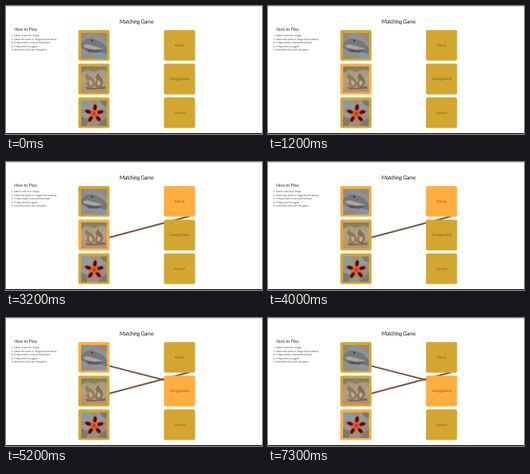
Recreate the animation shown at these times as an HTML page. Size 320 by 161 pixels, loop 7400 ms.

```html
<!DOCTYPE html>
<html lang="en">
<head>
<meta charset="utf-8">
<title>Matching Game</title>
<style>
  html, body { margin: 0; width: 100%; height: 100%; overflow: hidden; background: #fff; }
  svg { display: block; width: 100%; height: 100%; }
  text { text-rendering: geometricPrecision; fill: #222; }
  .title { font: 6.9px Lato, sans-serif; letter-spacing: -.42px; text-anchor: middle; }
  .how { font: 5.25px Lato, sans-serif; }
  .steps { font: 2.97px "Open Sans", sans-serif; }
  .word { font: 4.45px "Open Sans", sans-serif; text-anchor: middle; fill: #795548; }

  .card { fill: #d3a72f; }
  .line { stroke: #795548; stroke-width: 1.9; visibility: hidden; }
  .card, .line { animation: 7.4s linear infinite; }
  #l1 { animation-name: pick-l1; }
  #l2 { animation-name: pick-l2; }
  #l3 { animation-name: pick-l3; }
  #r1 { animation-name: pick-r1; }
  #r2 { animation-name: pick-r2; }
  #link1 { animation-name: link1; animation-timing-function: step-end; }
  #link2 { animation-name: link2; animation-timing-function: step-end; }

  @keyframes pick-l2 {
    0%, .7%, 54.4%, 100% { fill: #d3a72f; }
    2.7%, 52.8% { fill: #ffae3f; }
  }
  @keyframes pick-r1 {
    0%, 27.1%, 70.2%, 100% { fill: #d3a72f; }
    28.3%, 69% { fill: #ffae3f; }
  }
  @keyframes pick-l1 {
    0%, 52.8%, 91.2%, 100% { fill: #d3a72f; }
    54.4%, 89.3% { fill: #ffae3f; }
  }
  @keyframes pick-r2 {
    0%, 69% { fill: #d3a72f; }
    70.2%, 100% { fill: #ffae3f; }
  }
  @keyframes pick-l3 {
    0%, 89.3% { fill: #d3a72f; }
    91.2%, 100% { fill: #ffae3f; }
  }
  @keyframes link1 { 0% { visibility: hidden; } 28%, 100% { visibility: visible; } }
  @keyframes link2 { 0% { visibility: hidden; } 70%, 100% { visibility: visible; } }
</style>
</head>
<body>
<svg viewBox="0 0 320 161">
  <defs>
    <clipPath id="frame"><rect width="32.5" height="32.5"/></clipPath>
    <linearGradient id="water" x2=".3" y2="1">
      <stop stop-color="#8b9297"/><stop offset=".5" stop-color="#8c9296"/><stop offset="1" stop-color="#8297a8"/>
    </linearGradient>
    <linearGradient id="scrub" x2="0" y2="1">
      <stop stop-color="#a09678"/><stop offset=".5" stop-color="#b3a283"/><stop offset="1" stop-color="#b58f6c"/>
    </linearGradient>
    <linearGradient id="leaves" x2=".7" y2="1">
      <stop stop-color="#859baa"/><stop offset=".5" stop-color="#929c9f"/><stop offset="1" stop-color="#94877a"/>
    </linearGradient>
    <g id="petal">
      <path d="M0 0C-5-4-4-11 0-14C4-11 5-4 0 0Z" fill="#e25a34"/>
      <ellipse cy="-8" rx="2" ry="3.7" fill="#2a1d1b"/>
    </g>
    <rect id="tile" width="39" height="38.6" rx="2"/>
  </defs>

  <rect width="320" height="161" fill="#fff"/>
  <rect width="320" height=".8" fill="#ccc"/>
  <rect y="160" width="320" height="1" fill="#000"/>

  <text class="title" x="163.3" y="22.3">Matching Game</text>
  <text class="how" x="10.2" y="31.4">How to Play:</text>
  <g class="steps">
    <text x="6.8" y="38">1. Select a word or image</text>
    <text x="6.8" y="42.5">2. Select the word or image that matches</text>
    <text x="6.8" y="47">3. If they match a line will link them</text>
    <text x="6.8" y="51.5">4. If they don't try again</text>
    <text x="6.8" y="56">5. Link them all to win the game</text>
  </g>

  <path id="link1" class="line" d="M110 100L230 68"/>
  <path id="link2" class="line" d="M110 55.3L217 83"/>

  <use id="l1" class="card" href="#tile" x="90.4" y="30.2"/>
  <use id="l2" class="card" href="#tile" x="90.4" y="72.6"/>
  <use id="l3" class="card" href="#tile" x="90.4" y="115"/>
  <use id="r1" class="card" href="#tile" x="197.4" y="30.2"/>
  <use id="r2" class="card" href="#tile" x="197.4" y="72.6"/>
  <use id="r3" class="card" href="#tile" x="197.4" y="115"/>

  <text class="word" x="217" y="51">Milula</text>
  <text class="word" x="217" y="93.4">Danggalaba</text>
  <text class="word" x="217" y="135.8">Dundil</text>

  <!-- crocodile -->
  <g transform="translate(93.7 33.7)" clip-path="url(#frame)">
    <rect width="33" height="33" fill="url(#water)"/>
    <path d="M0 0H10L4 7L0 8ZM17 0H33V10L26 7Z" fill="#9a8873"/>
    <path d="M0 13Q6 6 14 7L22 10Q29 13 33 20V27L22 24L10 25L0 19Z" fill="#74787a"/>
    <path d="M2 16Q8 13 14 16L28 20L17 21L6 19Z" fill="#aaa79e"/>
    <path d="M5 20L17 22L28 22L20 25L10 24Z" fill="#56595d"/>
    <circle cx="14" cy="10" r="1.2" fill="#33383b"/>
    <path d="M0 29L11 26L20 30L8 33H0Z" fill="#9a8a79"/>
  </g>

  <!-- wallabies -->
  <g transform="translate(93.7 76.1)" clip-path="url(#frame)">
    <rect width="33" height="33" fill="url(#scrub)"/>
    <path d="M0 0H33V6L25 4L16 7L8 4L0 8Z" fill="#858067"/>
    <path d="M5 13L7 8L9 11L13 13L17 18L17 24L12 27L7 24L8 18Z" fill="#8f7c61"/>
    <path d="M18 14L21 8L23 11L26 14L28 20L25 26L19 26L17 22L20 17Z" fill="#85705a"/>
    <path d="M10 17L14 19L14 23L11 24ZM21 17L25 20L23 24L20 23Z" fill="#c4b193"/>
    <path d="M5 26L17 27L30 25L31 28L8 29Z" fill="#7d6650"/>
  </g>

  <!-- seed pods -->
  <g transform="translate(93.7 118.5)" clip-path="url(#frame)">
    <rect width="33" height="33" fill="url(#leaves)"/>
    <path d="M0 20L9 24L7 33H0ZM23 0H33V8L27 6ZM25 26L33 22V33H21Z" fill="#7c7a6f"/>
    <path d="M9 0L15 6L21 0ZM0 11L7 14L0 17ZM13 33L17 28L22 33Z" fill="#a38c7d"/>
    <g transform="translate(16.5 17)">
      <use href="#petal" transform="rotate(8)"/>
      <use href="#petal" transform="rotate(75)"/>
      <use href="#petal" transform="rotate(140)"/>
      <use href="#petal" transform="rotate(215)"/>
      <use href="#petal" transform="rotate(290)"/>
      <circle r="2.2" fill="#b94329"/>
    </g>
  </g>
</svg>
</body>
</html>
```
